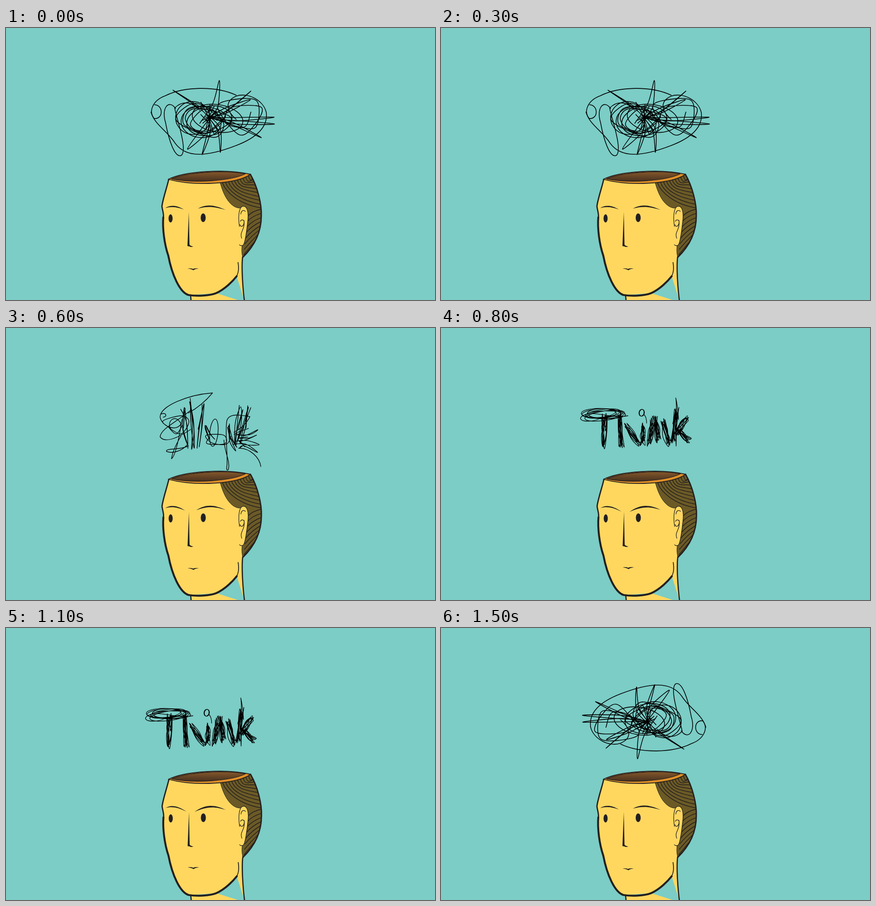
Animation, 941 px wide and 595 px high, one loop 1600 ms. Source, as an HTML page with a canvas:

```html
<!DOCTYPE html>
<html lang="en">
<head>
<meta charset="utf-8">
<title>Think</title>
<style>
html, body { margin: 0; width: 100%; height: 100%; overflow: hidden; background: #7bcdc6; }
canvas { display: block; }
</style>
</head>
<body>
<canvas id="stage" width="941" height="595"></canvas>
<script>
const ctx = document.getElementById('stage').getContext('2d');
const TEAL = '#7bcdc6', SKIN = '#ffd75f', INK = '#231f20', HAIR = '#6b5a26', RIM = '#df8f27';
const STEP = 100, STEPS = 16, GOLDEN = 2.4;

// Seeded random numbers keep the pen strokes the same on every run.
let seed = 7;
const rnd = () => (seed = (seed * 16807) % 2147483647) / 2147483647;
const jitter = size => (rnd() - 0.5) * size;
const mix = (a, b, k) => a + (b - a) * k;
const shape = d => new Path2D(d);

// Smooth curve through all the points.
function spline(path, pts) {
  const at = i => pts[Math.max(0, Math.min(pts.length - 1, i))];
  path.moveTo(...pts[0]);
  for (let i = 0; i < pts.length - 1; i++) {
    const [a, b, c, d] = [at(i - 1), at(i), at(i + 1), at(i + 2)];
    path.bezierCurveTo(
      b[0] + (c[0] - a[0]) / 6, b[1] + (c[1] - a[1]) / 6,
      c[0] - (d[0] - b[0]) / 6, c[1] - (d[1] - b[1]) / 6, c[0], c[1]);
  }
}

function ring(path, x, y, rx, ry, tilt = 0) {
  path.moveTo(x + rx * Math.cos(tilt), y + rx * Math.sin(tilt));
  path.ellipse(x, y, rx, ry, tilt, 0, Math.PI * 2);
}

// One pen line that wanders around inside an ellipse.
function scrawl(path, x, y, rx, ry, count) {
  const pts = [];
  for (let i = 0; i < count; i++) {
    const angle = i * GOLDEN / 2 + jitter(1), reach = mix(0.45, 1, rnd());
    pts.push([x + rx * reach * Math.cos(angle), y + ry * reach * Math.sin(angle)]);
  }
  spline(path, pts);
}

// Quick back-and-forth pen strokes between two ends.
function hatch(path, [x1, y1, x2, y2], width, count, overshoot = 14) {
  const pts = [];
  for (let i = 0; i < count; i++) {
    const end = i % 2;
    pts.push([(end ? x2 : x1) + jitter(width), (end ? y2 : y1) + jitter(overshoot)]);
    pts.push([mix(x1, x2, 0.5) + jitter(width), mix(y1, y2, 0.5) + jitter(20)]);
  }
  spline(path, pts);
}

function makeTangle() {
  const path = shape(`M326,168 C345,168 346,200 325,198 C312,182 322,158 350,148
    C390,128 460,126 505,147 M318,184 C326,212 355,226 371,252 C395,285 440,282 505,257
    C560,236 574,210 571,185 C565,158 530,140 505,149 C480,160 482,180 505,200
    M372,176 C357,155 340,175 350,207 C357,245 370,284 384,279 C400,268 373,195 370,175
    C390,155 412,165 425,180`);
  const tips = [[468, 115], [537, 138], [536, 157], [588, 195], [589, 210],
    [560, 240], [470, 272], [430, 277], [398, 265], [366, 136]];
  for (const [x, y] of tips) {
    const side = () => [mix(455, x, 0.3) + jitter(24), mix(196, y, 0.3) + jitter(24)];
    spline(path, [[445 + jitter(40), 196 + jitter(30)], side(), [x, y], side(), [445, 196]]);
  }
  scrawl(path, 432, 202, 62, 42, 22);
  scrawl(path, 515, 192, 54, 44, 14);
  for (let i = 0; i < 4; i++) {
    ring(path, 410 + i * 18, 203 + jitter(14), 38 + i * 6, 36 - i * 2, jitter(0.4));
  }
  for (let i = 0; i < 12; i++) {
    const angle = i * GOLDEN, reach = 8 + (i % 4) * 10;
    path.moveTo(445, 196);
    path.lineTo(445 + reach * Math.cos(angle), 196 + reach * Math.sin(angle));
  }
  return path;
}

function makeHalfWord() {
  const path = shape(`M400,186 C420,175 438,160 453,142 C400,146 338,170 338,195
    C342,215 372,228 384,210 C372,185 350,205 362,222 M341,188 C352,184 354,194 345,195
    M405,180 C375,205 340,220 338,238 C350,255 385,235 405,222
    M400,258 C380,268 350,262 352,270 C365,275 385,270 398,255
    M363,286 Q374,278 386,200 M363,286 Q366,266 384,236
    M478,245 C480,275 492,290 488,309 Q484,314 484,306 C488,285 480,240 484,205
    C487,185 515,190 535,194 Q525,215 500,228
    M510,263 C535,262 556,283 559,303`);
  const stems = [[388, 175, 394, 258], [401, 156, 411, 268], [431, 172, 423, 260],
    [435, 208, 452, 250], [490, 215, 500, 262], [516, 175, 503, 258], [531, 170, 510, 248]];
  for (const stem of stems) hatch(path, stem, 13, 5);
  ring(path, 456, 229, 9, 30, 0.1);
  for (let i = 0; i < 4; i++) {
    hatch(path, [505, 236 + i * 8, 549, 219 + i * 16], 16, 3);
  }
  scrawl(path, 372, 210, 34, 28, 8);
  scrawl(path, 465, 243, 40, 18, 9);
  return path;
}

function makeWord() {
  const path = shape(`M345,200 C318,208 300,202 308,194 C330,176 370,200 410,192
    M446,190 Q451,196 451,208 M516,200 Q517,168 515,153 Q519,170 521,200`);
  for (let i = 0; i < 7; i++) {
    ring(path, 354 + jitter(18), 190 + jitter(8), 36 + rnd() * 9, 7 + rnd() * 4, jitter(0.2) - 0.08);
  }
  for (let i = 0; i < 3; i++) ring(path, 440 + jitter(2), 185 + jitter(2), 5.5, 7.5, 0.2);
  const bars = [[359, 190, 357, 260], [391, 188, 396, 258], [408, 214, 433, 252],
    [443, 214, 442, 252], [464, 203, 458, 252], [470, 198, 478, 246], [486, 204, 499, 253],
    [518, 180, 510, 253], [517, 228, 539, 197], [520, 222, 545, 248]];
  for (const bar of bars) hatch(path, bar, 12, 13);
  return path;
}

const tangle = makeTangle(), halfWord = makeHalfWord(), word = makeWord();

const BACK = 'C542,480 560,450 560,411 C561,385 552,348 536,320';
const BROW_SIDE = 'M357,331 C352,352 344,374 342,390 C343,399 347,407 345,416';
const JAW = 'C343,437 347,472 356,498 C364,540 381,578 400,584 C417,587 446,586 461,580 C481,571 498,553 506,543';
const head = shape(`${BROW_SIDE} ${JAW} L524,600 L406,600 L405,584
  L461,580 L524,600 C520,570 517,530 519,502 ${BACK} C490,332 410,339 357,331 Z`);
const browSide = shape(BROW_SIDE);
const faceLine = shape('M345,414 ' + JAW);
const jawEnd = shape('M504,545 C510,538 511,526 509,513');
const backLine = shape(`M519,502 ${BACK}`);
const neckLine = shape('M519,501 C516,525 520,575 523,597 M405,586 L406,597');
const hair = shape(`M470,339 C477,366 491,392 512,394 C529,385 533,402 530,425
  C528,445 524,470 518,476 C516,487 518,495 519,502 ${BACK} C515,329 490,337 470,339 Z`);
const ear = shape(`M512,434 C509,415 510,393 519,390 C529,388 533,402 530,425
  C528,443 524,472 520,475 C517,477 513,476 512,474`);
const earFolds = shape(`M514,423 C517,417 524,420 522,427 C520,435 515,436 513,430
  M522,421 C525,442 511,446 517,460 M515,407 C516,400 520,397 525,401`);
const rim = shape('M356,331 C390,314 480,307 536,320 C510,341 415,347 356,331 Z');
const hollow = shape('M363,330 C398,316 478,310 525,319 C493,335 412,340 363,330 Z');
const nose = shape('M401,402 L402.5,474 Q405,477 411,478 Q405,480 403,478 L398,477 Z');

const hairLines = new Path2D();
for (let i = 0; i < 10; i++) {
  const x = 475 + i * 6.3, y = 400 - i * 8;
  hairLines.moveTo(x, 339 - i * 1.8);
  hairLines.bezierCurveTo(x + 7, 358 - i, mix(510, 545, i / 10), y - 14, 562, y - 6);
  hairLines.moveTo(562 - i * i * 0.2, 396 + i * 9);
  hairLines.quadraticCurveTo(540 - i * 0.4, 400 + i * 11, 530 - i * 1.2, 412 + i * 12);
}

const cavity = ctx.createLinearGradient(0, 314, 0, 336);
cavity.addColorStop(0, '#87592b');
cavity.addColorStop(1, '#45301f');

function fill(path, color) {
  ctx.fillStyle = color;
  ctx.fill(path);
}

function stroke(path, width, color = INK) {
  ctx.lineWidth = width;
  ctx.strokeStyle = color;
  ctx.stroke(path);
}

function drawHair() {
  fill(hair, HAIR);
  ctx.save();
  ctx.clip(hair);
  stroke(hairLines, 1.5);
  ctx.restore();
  stroke(hair, 1);
}

function drawFeatures(frown) {
  const eyes = new Path2D();
  ring(eyes, 361, 416.5, 4.5, 9);
  ring(eyes, 432.5, 415, 5.5, 9.5);
  fill(eyes, INK);
  fill(nose, INK);

  const lx = mix(390, 397, frown), ly = mix(397, 403, frown);
  fill(shape(`M349,394 C360,387 374,387 ${lx},${ly} C376,392 363,390 349,394 Z`), INK);
  const rx = mix(421, 411, frown), ry = mix(395, 404, frown);
  fill(shape(`M${rx},${ry} C438,385 456,386 482,398 C458,391 444,389 ${rx},${ry} Z`), INK);

  const y = 526 - 4 * frown * frown;
  fill(shape(`M398,${y} Q406,${y - 1} 410,${y + 1} Q415,${y - 1} 423,${y}
    Q414,${y + 1} 411,${y + 4} Q407,${y + 1} 398,${y} Z`), INK);
}

function drawHead(frown) {
  ctx.save();
  ctx.translate(frown * 0.5, 0);
  fill(head, SKIN);
  drawHair();
  fill(ear, SKIN);
  stroke(ear, 1.3);
  stroke(earFolds, 1.3);
  stroke(browSide, 2.8);
  stroke(faceLine, 4.2);
  stroke(jawEnd, 1.8);
  stroke(backLine, 2.8);
  stroke(neckLine, 2.6);
  fill(rim, RIM);
  stroke(rim, 1.8);
  fill(hollow, cavity);
  stroke(hollow, 1.3);
  drawFeatures(frown);
  ctx.restore();
}

function drawThought(phase) {
  if (phase >= 6) return stroke(word, 1.3, '#000');
  if (phase >= 4) return stroke(halfWord, 1.4, '#000');
  ctx.save();
  if (phase > 2) {
    ctx.translate(899, 401);
    ctx.rotate(Math.PI);
  }
  stroke(tangle, 1.6, '#000');
  ctx.restore();
}

const start = performance.now();
function draw() {
  const step = Math.floor((performance.now() - start) / STEP) % STEPS;
  // Runs from tangle to word and back: 0.5 is calm, 7.5 is full focus.
  const phase = Math.abs((step + 22.5) % STEPS - 8);
  const frown = Math.max(0, Math.min(1, (phase - 2.5) / 5));
  ctx.fillStyle = TEAL;
  ctx.fillRect(0, 0, 941, 595);
  ctx.lineCap = ctx.lineJoin = 'round';
  drawHead(frown);
  drawThought(phase);
  requestAnimationFrame(draw);
}
draw();
</script>
</body>
</html>
```
